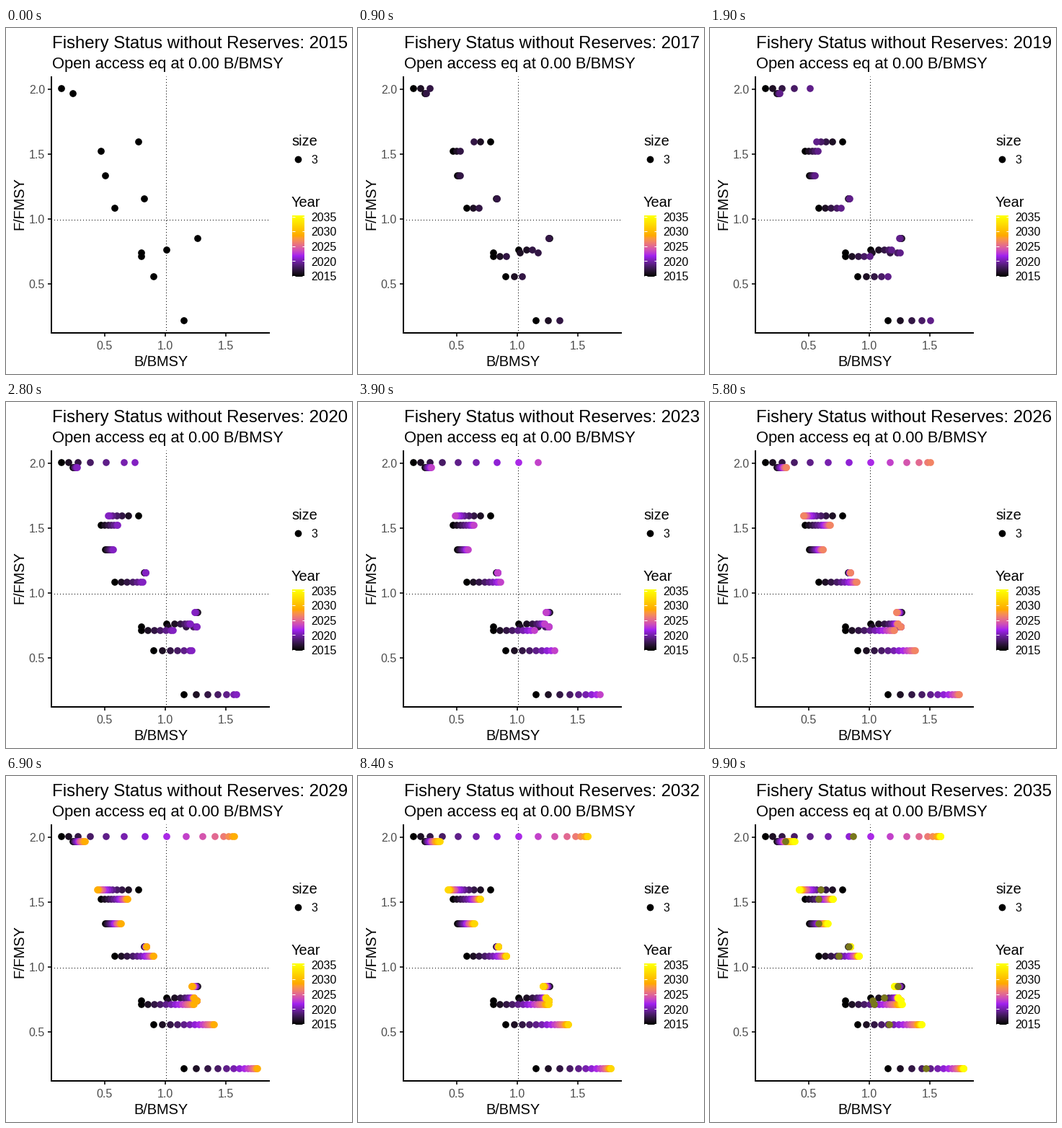
Recreate the animation shown at these times as a matplotlib script. Size 480 by 480 pixels, loop 10 s.

```python
import numpy as np
import matplotlib.pyplot as plt
from matplotlib.animation import FuncAnimation

plt.rcParams["font.family"] = "Liberation Sans"

SIZE, DPI = 480, 72          # at 72 dpi one point is one pixel
LEFT, RIGHT, TOP, BOTTOM = 63, 366, 67, 423
FIRST_YEAR, YEARS = 2015, 21

# Half-way poses between years: every 5 frames, later every 4
HALFWAY = [*range(3, 84, 5), *range(87, 100, 4)]

# Yearly growth rates
SLOW, MEDIUM, FAST, RAPID = 0.03, 0.142, 0.278, 0.6


def px(b):
    return 53 + 168 * b


def py(f):
    return 445 - 180 * f


def stock(f, b, rate=FAST, limit=None):
    """Logistic growth under constant F/FMSY, settling at 2 - f by default."""
    limit = 2 - f if limit is None else limit
    path = []
    for _ in range(YEARS):
        path.append((b, f))
        b += rate * b * (limit - b)
    return path


# Indexed by year, stock, (B/BMSY, F/FMSY)
paths = np.array([
    stock(2.006, 0.144, limit=1.59),
    stock(1.967, 0.238, SLOW, limit=1.12),
    stock(1.594, 0.780),
    stock(1.522, 0.470, limit=0.706),
    stock(1.333, 0.506, MEDIUM, limit=0.69),
    stock(1.156, 0.827),
    stock(1.083, 0.583),
    stock(0.850, 1.268, SLOW),
    stock(0.761, 1.012),
    stock(0.739, 0.804, RAPID),
    stock(0.711, 0.804, MEDIUM),
    stock(0.556, 0.905, MEDIUM),
    stock(0.217, 1.155, MEDIUM),
]).swapaxes(0, 1)

# Linear sRGB to XYZ, scaled so that white is (1, 1, 1)
XYZ = np.array([[0.4124, 0.3576, 0.1805],
                [0.2126, 0.7152, 0.0722],
                [0.0193, 0.1192, 0.9505]])
XYZ /= XYZ.sum(axis=1, keepdims=True)


def to_lab(rgb):
    """Cube-root responses; mixing these is the same as mixing in CIELab."""
    c = np.asarray(rgb) / 255
    lin = np.where(c <= 0.04045, c / 12.92, ((c + 0.055) / 1.055) ** 2.4)
    t = lin @ XYZ.T
    return np.where(t > 0.008856, np.cbrt(t), 7.787 * t + 16 / 116)


def to_rgb(lab):
    t = np.where(lab > 0.2069, lab ** 3, (lab - 16 / 116) / 7.787)
    lin = np.clip(t @ np.linalg.inv(XYZ).T, 0, 1)
    c = np.where(lin <= 0.0031308, lin * 12.92,
                 1.055 * lin ** (1 / 2.4) - 0.055)
    return np.clip(c, 0, 1)


# Black, purple, orange, yellow
STOPS = to_lab([(0, 0, 0), (160, 32, 240), (255, 165, 0), (255, 255, 0)])


def year_lab(t):
    """Mixing values for years t since the first one."""
    pos = np.clip(t, 0, YEARS - 1) / (YEARS - 1) * (len(STOPS) - 1)
    return np.column_stack([np.interp(pos, range(len(STOPS)), ch)
                            for ch in STOPS.T])


labs = year_lab(np.arange(YEARS))

fig = plt.figure(figsize=(SIZE / DPI, SIZE / DPI), dpi=DPI, facecolor="white")
ax = fig.add_axes([0, 0, 1, 1])
ax.axis("off")


def line(x, y, color="black", width=2, **style):
    ax.plot(x, y, color=color, lw=width, solid_capstyle="butt",
            dash_capstyle="butt", **style)


def label(x, y, text, size, color="black", **style):
    return ax.text(x, y, text, size=size, color=color, va="baseline", **style)


# Reference lines at 1
dotted = dict(width=1, ls=(0.5, (1, 3)), zorder=1)
line([221.5, 221.5], [BOTTOM, TOP], **dotted)
line([LEFT, RIGHT], [265.5, 265.5], **dotted)

# Axes
for v in (0.5, 1.0, 1.5):
    x = px(v)
    line([x, x], [BOTTOM, BOTTOM + 5], "#333333")
    label(x, 446, f"{v:.1f}", 16, "#4d4d4d", ha="center")
for v in (0.5, 1.0, 1.5, 2.0):
    y = py(v)
    line([LEFT - 5, LEFT], [y, y], "#333333")
    label(54, y + 6, f"{v:.1f}", 16, "#4d4d4d", ha="right")
line([LEFT, LEFT], [TOP, BOTTOM + 1], zorder=3)
line([LEFT - 1, RIGHT], [BOTTOM, BOTTOM], zorder=3)
label((LEFT + RIGHT) / 2 + 0.5, 469, "B/BMSY", 20, ha="center")
label(24.5, (TOP + BOTTOM) / 2 - 2, "F/FMSY", 20, ha="center",
      rotation=90, rotation_mode="anchor")

# Headings
title = label(63.5, 28, "", 24)
label(63.5, 56, "Open access eq at 0.00 B/BMSY", 22)

# Size legend
dot_style = dict(s=9.7 ** 2, linewidths=0)
label(396, 163, "size", 20)
ax.scatter([405], [182], color="black", **dot_style)
label(423, 188, "3", 16)

# Year legend
label(396, 248, "Year", 20)
bar_top, bar_bottom = 260, 345
bar_y = np.arange(bar_top, bar_bottom) + 0.5
bar = to_rgb(year_lab((343.5 - bar_y) / 82 * 20))
ax.imshow(bar[:, None, :], extent=(397, 414, bar_bottom, bar_top),
          aspect="auto", interpolation="nearest", zorder=1)
for year in range(2015, 2036, 5):
    y = 343.5 - (year - FIRST_YEAR) * 4.1
    for x in (397, 410.5):
        line([x, x + 3.5], [y, y], "white", 1)
    label(423, y + 6.5, str(year), 16)

points = ax.scatter([], [], zorder=2, **dot_style)
ax.set_xlim(0, SIZE)
ax.set_ylim(SIZE, 0)


def draw(i):
    now = sum(h < i for h in HALFWAY)
    pos, lab = paths[:now + 1], labs[:now + 1]
    if i in HALFWAY:
        pair = [now, (now + 1) % YEARS]
        pos = np.vstack([pos, paths[pair].mean(axis=0, keepdims=True)])
        lab = np.vstack([lab, labs[pair].mean(axis=0)])
    b, f = pos.reshape(-1, 2).T
    # Dots sit on whole pixels
    points.set_offsets(np.round(np.column_stack([px(b), py(f)])))
    points.set_facecolors(np.repeat(to_rgb(lab), paths.shape[1], axis=0))
    title.set_text(f"Fishery Status without Reserves: {FIRST_YEAR + now}")
    return points, title


anim = FuncAnimation(fig, draw, frames=100, interval=100, repeat=True)
plt.show()
```
